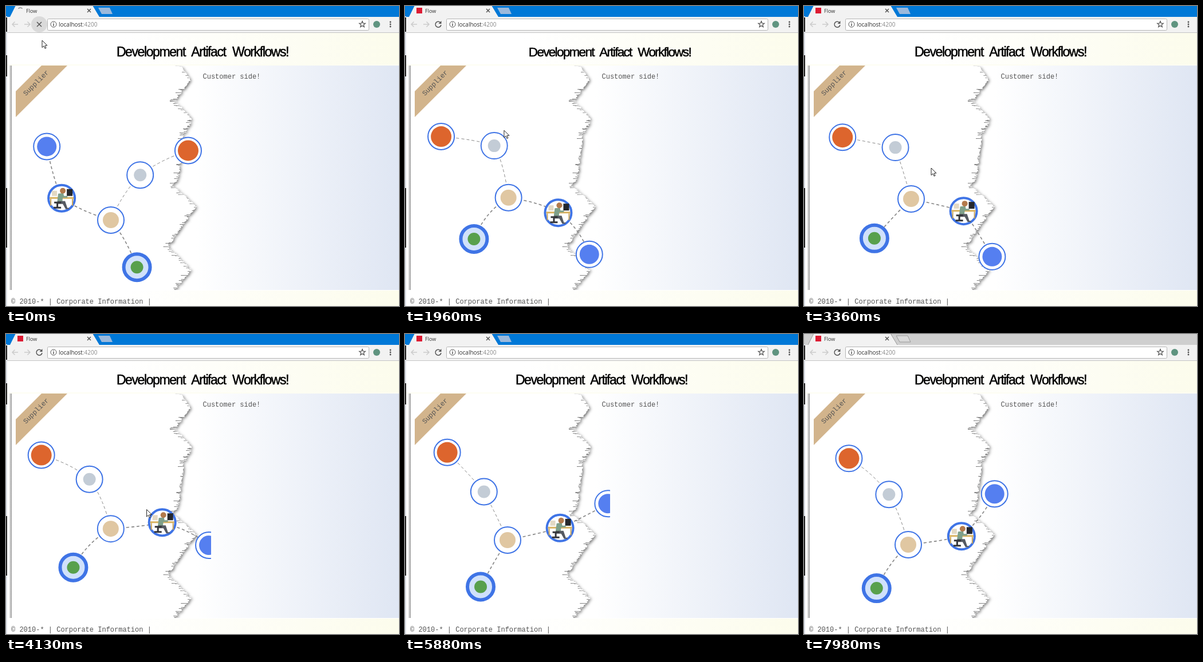
An HTML page that plays this animation: 686x524 px, repeating every 8050 ms.

```html
<!DOCTYPE html>
<html lang="en">
<head>
<meta charset="utf-8">
<title>Flow</title>
<style>
  html, body { margin: 0; width: 100%; height: 100%; overflow: hidden; background: #fff; }
  svg { display: block; }
  .ui { font-family: "Open Sans", sans-serif; font-size: 10px; fill: #333; }
  .mono { font-family: "Liberation Mono", "Courier New", monospace; font-size: 12px; fill: #555; }
  #title { font: 23px "Liberation Sans", Arial, sans-serif; text-anchor: middle; stroke: #000; stroke-width: .5; }
  #tear { fill: #fff; filter: drop-shadow(2px 2px 2.5px rgba(0, 0, 0, .55)); }
  #edges path { fill: none; stroke: #858585; stroke-dasharray: 5 4; }
  .ring { stroke: #3f74e6; fill: #fff; }
  .line { fill: none; stroke: #555; stroke-width: 1.5; }
</style>
</head>
<body>
<svg width="686" height="524" viewBox="0 0 686 524">
  <defs>
    <linearGradient id="cream"><stop offset=".3" stop-color="#fff"/><stop offset="1" stop-color="#fcfcec"/></linearGradient>
    <linearGradient id="sky"><stop offset=".08" stop-color="#fff"/><stop offset="1" stop-color="#dfe6f3"/></linearGradient>
    <linearGradient id="side"><stop offset="0" stop-color="#fff"/><stop offset="1" stop-color="#999"/></linearGradient>
    <clipPath id="stage"><rect x="10" y="104" width="348" height="392"/></clipPath>
  </defs>

  <rect width="686" height="524" fill="#fff"/>
  <g id="page">
    <rect x="2" y="47" width="684" height="57" fill="url(#cream)"/>
    <rect x="2" y="497" width="684" height="27" fill="url(#cream)"/>
    <rect x="2" y="102" width="684" height="2" fill="#fdfdf2"/>
    <rect x="300" y="104" width="386" height="392" fill="url(#sky)"/>
    <g clip-path="url(#stage)"><path id="tear"/></g>
    <rect x="5" y="104" width="5" height="392" fill="url(#side)"/>
    <path d="M62 104H107L17 194V149Z" fill="#d2b48c"/>
    <text class="mono" transform="translate(55 137) rotate(-45)" text-anchor="middle">Supplier</text>
    <text class="mono" x="343.5" y="127">Customer side!</text>
  </g>
  <text id="footer" class="mono" x="9" y="520">© 2010-* | Corporate Information |</text>
  <text id="title">Development Artifact Workflows!</text>
  <g id="graph" clip-path="url(#stage)"><g id="edges"></g><g id="nodes"></g></g>

  <rect id="bar" width="686" height="20"/>
  <path id="tab" d="M7 19L17 -1H151L163 19" fill="#f2f2f2"/>
  <path id="plus" d="M161 3H181L186 14H167Z"/>
  <rect y="19" width="686" height="27" fill="#f2f2f2"/>
  <rect y="46" width="686" height="1" fill="#c4c4c4"/>
  <rect id="favicon" x="20" y="3" width="10" height="10" fill="#dd1b33"/>
  <path id="spinner" class="line" d="M20 8A5 5 0 0 1 25 3" style="stroke:#888"/>
  <text class="ui" x="35" y="12" style="font-size:9px">Flow</text>
  <path class="line" d="M142 5L148 11M148 5L142 11"/>
  <path class="line" d="M21 32H11M15.5 27.5L11 32L15.5 36.5M32 32H42M37.5 27.5L42 32L37.5 36.5" style="stroke:#ccc"/>
  <g id="stop"><circle cx="58" cy="32" r="14" fill="#dadada"/><path class="line" d="M54 28L62 36M62 28L54 36"/></g>
  <g id="reload"><path class="line" d="M61.5 28.5A5 5 0 1 0 63 33"/><path d="M63.5 26V31H58.5Z" fill="#555"/></g>
  <rect x="72.5" y="22.5" width="561" height="20" rx="2" fill="#fff" stroke="#b4b4b4"/>
  <circle class="line" cx="83" cy="32" r="5" style="stroke-width:1"/>
  <path class="line" d="M83 31V35M83 29V30"/>
  <text class="ui" x="92" y="36">localhost<tspan fill="#888">:4200</tspan></text>
  <path id="star" class="line" style="stroke-width:1.2"/>
  <circle cx="647" cy="32" r="6" fill="#5f9480"/>
  <path d="M671 28h0M671 32h0M671 36h0" stroke="#555" stroke-width="2.8" stroke-linecap="round"/>
  <rect y="18" width="2" height="506" fill="#dfe3ea"/>
  <path d="M0 86H2V123H0ZM0 318H2V422H0ZM0 20H2V45H0Z" fill="#222"/>
  <path id="cursor" d="M0 0V12.5L3 9.8L5 14.2L7 13.3L5 9H9Z" fill="#fff" stroke="#222"/>
</svg>
<script>
const LOOP = 8050, STEP = 70, BLANK = 350, SHELL = 840, START = 1190, LINK = 94;
const $ = id => document.getElementById(id);
const clamp = v => Math.max(0, Math.min(1, v));
const smooth = v => v * v * (3 - 2 * v);
const mix = (a, b, p) => a + (b - a) * p;
const show = (id, on) => $(id).setAttribute('display', on ? 'inline' : 'none');
const add = (parent, name, attrs) => {
  const el = document.createElementNS('http://www.w3.org/2000/svg', name);
  for (const k in attrs) el.setAttribute(k, attrs[k]);
  return parent.appendChild(el);
};

// Value at `at` of rows that start with their own position.
function sample(keys, at, ease = p => p) {
  const i = keys.findIndex(k => k[0] > at);
  if (i < 1) return keys.at(i).slice(1);
  const a = keys[i - 1], b = keys[i], p = ease((at - a[0]) / (b[0] - a[0]));
  return a.slice(1).map((v, j) => mix(v, b[j + 1], p));
}

// The graph is a linkage of equal links around the hub.
// Pose: time, hub x, hub y, right arm stretch, link bend, then the bearing of each link in degrees.
const links = [[2, 1], [1, 0], [2, 3], [3, 4], [2, 5]];
const oldPose = [183, 374, 1, .2, -57, -27, 204, 254, 61];
const poses = [
  [START, 187, 333, 1, .2, -110, -169, 10, 70, 131],
  [2520, 176, 336, .94, .45, -102, -171, 22, 41, 129],
  [3360, 187, 337, 1, .05, -107, -169, 13, 58, 133],
  [4830, 179, 343, .93, .5, -119, -139, -25, -3, 135],
  [5880, 179, 360, 1, .05, -116, -133, -13, -27, 120],
  [7980, 182, 368, 1, .2, -111, -138, -9, -52, 126]
];
const pointer = [[0, 63, 60], [SHELL, 84, 124], [START, 84, 124], [2520, 228, 275],
  [3360, 222, 283], [4830, 266, 327], [5600, 612, 526]];

function tearPath() {
  const bends = [[104, 304], [128, 321], [165, 294], [198, 324], [225, 309], [300, 300],
    [312, 290], [350, 331], [385, 305], [420, 282], [460, 322], [496, 293]];
  let seed = 7, d = 'M10 104';
  const rand = () => (seed = seed * 16807 % 2147483647) / 2147483647;
  for (let y = 104; y < 496; y++) {
    const spike = rand() < .3 ? -9 * rand() : 3 * rand();
    d += `H${(sample(bends, y)[0] + spike).toFixed(1)}V${y + 1}`;
  }
  return d + 'H10Z';
}
$('tear').setAttribute('d', tearPath());

$('star').setAttribute('d', 'M' + Array.from({ length: 10 }, (_, i) => {
  const a = i * Math.PI / 5, r = i % 2 ? 2.4 : 5.6;
  return `${622 + r * Math.sin(a)} ${32 - r * Math.cos(a)}`;
}).join('L') + 'Z');

const badges = [[18, '#dd652d'], [11, '#c3ccd6'], [14, '#e0c7a2'], null, [17, '#557ff0'], [11, '#58a04c']];
const nodes = badges.map(badge => {
  const el = add($('nodes'), 'g', {});
  const ring = add(el, 'circle', { class: 'ring', r: 23, 'stroke-width': 2 });
  if (badge) add(el, 'circle', { r: badge[0], fill: badge[1] });
  else drawWorker(el);
  return { el, ring };
});
const edges = links.map(() => add($('edges'), 'path', {}));

function drawWorker(g) {
  const part = (d, fill) => add(g, 'path', { d, fill });
  part('M-17 -13H-8V-4H-17Z', '#e3d9c4');
  part('M9 -16H19V-4H9Z', '#25272c');
  part('M-21 -2H21V1H-21Z', '#d9b25f');
  part('M-20 1H-18V13H-20ZM18 1H20V13H18Z', '#c9a457');
  part('M-6 -8L3 -9L4 -4L10 -4V-1H2L1 8H-8Z', '#7fa08a');
  part('M-7 5H6L10 17H13V19H7L2 10H-7Z', '#555a62');
  part('M-13 6H-1V9H-6V15H-1V18H-14V15H-9V9H-13Z', '#34363b');
  add(g, 'circle', { cx: 2, cy: -13, r: 5, fill: '#b37a4c' });
}

function drawGraph(t) {
  const [x, y, stretch, bend, ...bearings] = t < BLANK ? oldPose : sample(poses, t);
  const glow = t < BLANK ? 1 : smooth(clamp((t - START) / 800));
  const at = [];
  at[2] = [x, y];
  links.forEach(([from, to], i) => {
    const a = bearings[i] * Math.PI / 180, arm = to === 3 || to === 4;
    const len = LINK * (arm ? stretch : 1), [x1, y1] = at[from];
    const [x2, y2] = at[to] = [x1 + len * Math.cos(a), y1 + len * Math.sin(a)];
    // Right of the hub a link leaves level; left of it, upright.
    const corner = to < 2 ? [x1, y2] : [x2, y1];
    const cx = mix((x1 + x2) / 2, corner[0], bend), cy = mix((y1 + y2) / 2, corner[1], bend);
    edges[i].setAttribute('d', `M${x1} ${y1}Q${cx} ${cy} ${x2} ${y2}`);
    edges[i].setAttribute('stroke-width', to < 2 ? 1 : 1 + .6 * glow);
  });
  nodes.forEach(({ el }, i) => el.setAttribute('transform', `translate(${at[i]})`));
  nodes[3].ring.setAttribute('stroke-width', 2 + 2 * glow);
  nodes[5].ring.setAttribute('stroke-width', 3 + 3 * glow);
  nodes[5].ring.style.fill = `rgb(${mix(155, 208, glow)},${mix(188, 225, glow)},${mix(247, 251, glow)})`;
}

function drawTitle(t) {
  const p = t < BLANK ? 1 : 1 - (1 - clamp((t - START) / 980)) ** 2;
  $('title').setAttribute('transform',
    `translate(${mix(657, 343, p)} ${mix(78, 88, p)}) scale(${mix(.5, 1, p)})`);
  $('title').style.letterSpacing = mix(-8.3, -1.4, p) + 'px';
  $('title').style.wordSpacing = 6.5 * p + 'px';
}

function draw(t) {
  const loading = t < SHELL, ready = t < BLANK || t >= START, active = t < 7910;
  show('page', t < BLANK || !loading);
  show('footer', t < BLANK || t >= 910);
  show('title', ready);
  show('graph', ready);
  show('favicon', !loading);
  show('spinner', loading);
  show('stop', loading);
  show('reload', !loading);
  show('cursor', t < 5600);
  $('bar').setAttribute('fill', active ? '#0078d7' : '#cfcfcf');
  $('plus').setAttribute('fill', active ? '#9bb9dc' : '#d9d9d9');
  for (const id of ['tab', 'plus']) $(id).setAttribute('stroke', active ? 'none' : '#999');
  $('spinner').setAttribute('transform', `rotate(${45 + t * .4} 25 8)`);
  $('cursor').setAttribute('transform', `translate(${sample(pointer, t, smooth)})`);
  drawTitle(t);
  drawGraph(t);
}

const began = performance.now();
function frame() {
  const t = (performance.now() - began) % LOOP;
  draw(Math.floor(t / STEP) * STEP);
  requestAnimationFrame(frame);
}
frame();
</script>
</body>
</html>
```
